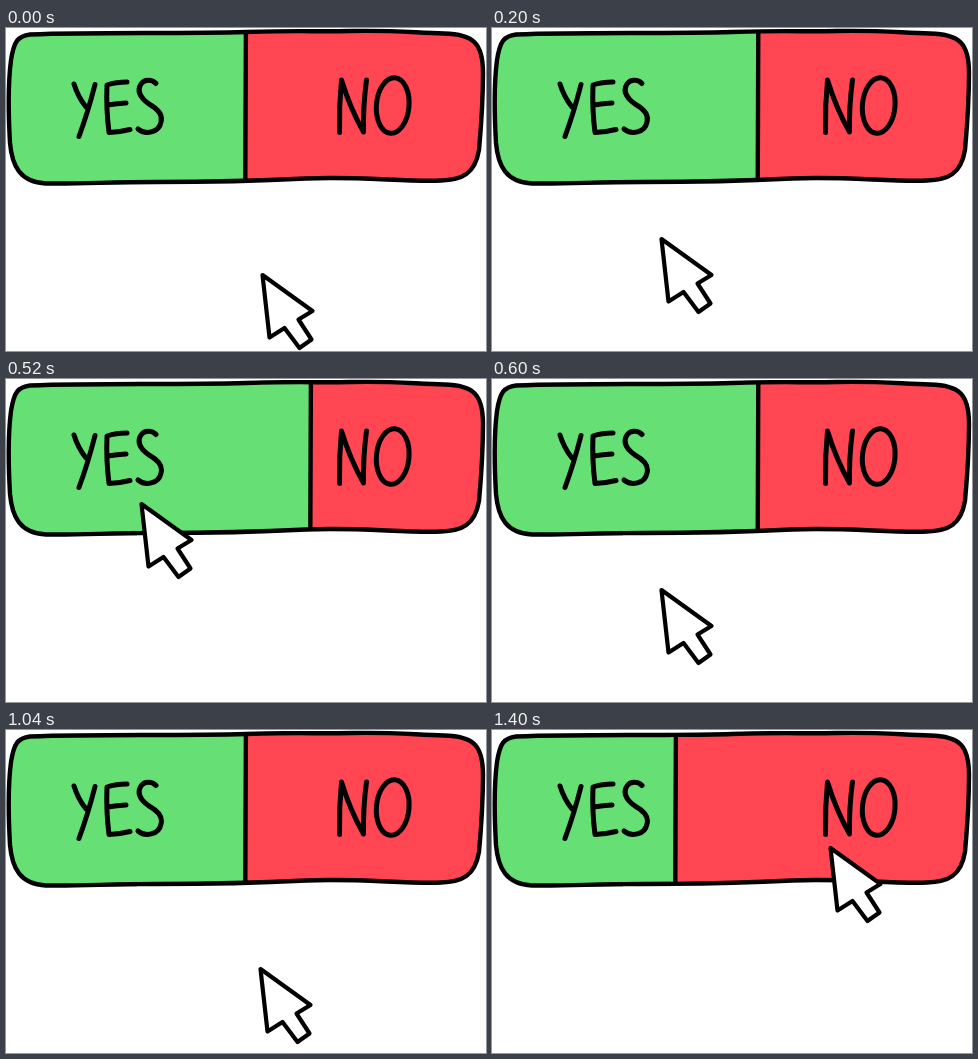
Write an HTML page that moves like this. It is 480 by 323 pixels and loops after 1.6 s.

```html
<!DOCTYPE html>
<html lang="en">
<head>
<meta charset="utf-8">
<title>Yes or no</title>
<style>
html, body { margin: 0; width: 100%; height: 100%; overflow: hidden; background: #fff; }
svg { display: block; width: 100vw; height: 100vh; }
.ink { fill: none; stroke: #000; stroke-width: 4.4; stroke-linecap: round; stroke-linejoin: round; }
.word { stroke-width: 5; }
#cursor { fill: #fff; stroke-width: 4.2; }
</style>
</head>
<body>
<svg viewBox="0 0 480 323" role="img" aria-label="A bar split between YES and NO, with a moving pointer">
  <defs>
    <path id="bar" d="M24 6.500C95 4 170 6 240 4S300 4 345 3S410 5 438 5.500C468 6 477 16 477 45C477 75 475 100 473 122C469 146 456 152 435 152.500C400 154 350 148 300 150.500S200 154 150 154S80 156 40 155.500C14 154 6 138 4 115C2 80 2 55 5 32C8 13 12 8 24 6.500Z"/>
    <clipPath id="inside"><use href="#bar"/></clipPath>
  </defs>
  <g clip-path="url(#inside)">
    <rect width="480" height="160" fill="#66e075"/>
    <g id="split">
      <rect width="480" height="160" fill="#ff4652"/>
      <path class="ink" d="M.4 0L-.2 160"/>
    </g>
  </g>
  <use class="ink" href="#bar"/>
  <g class="ink word">
    <path d="M68 56Q72 69 80 79M89 56.500Q82 84 73 108.500"/>
    <path d="M121 54Q110 54 101 57Q100 81 103 104.500Q114 104 124 101.500M102 77Q111 75.500 120 75"/>
    <path d="M150 55.500C146 51 138 51 135 56C130 64 136 71 143 76C152 81 157 87 155 94C153 105 139 107 132 101"/>
    <path d="M333.500 104.500Q333 78 335.500 52Q344 80 357.500 104Q357 78 360.500 52"/>
    <ellipse cx="386.700" cy="77.500" rx="16.300" ry="27.800" transform="rotate(5 386.700 77.500)"/>
  </g>
  <path id="cursor" class="ink" d="M0 0L50 36L36 44.500L49 64.500L37 73L22 53L7 62.500Z"/>
</svg>
<script>
const BEAT = 200, BEATS = 8, MIDDLE = 239.5;
const split = document.getElementById('split');
const cursor = document.getElementById('cursor');

// Pointer paths from rest to each answer: start, control, end
const toYes = { path: [[256.5, 247], [143, 236], [135.5, 125]], push: 65 };
const toNo = { path: [[254.5, 239], [276.5, 213.5], [338.5, 118]], push: -56 };

const bend = ([a, b, c], t) =>
  a.map((v, i) => (1 - t) ** 2 * v + 2 * t * (1 - t) * b[i] + t * t * c[i]);

function draw(time) {
  const beat = Math.floor(time / BEAT) % BEATS;
  const yes = beat < 4;
  const side = yes ? toYes : toNo;
  // Go to YES and back, then rest, then go to NO
  const t = yes ? 1 - Math.abs(beat - 2) / 2 : Math.max(0, (beat - 5) / 2);
  const edge = MIDDLE + side.push * t ** 1.3;
  split.setAttribute('transform', `translate(${edge})`);
  cursor.setAttribute('transform', `translate(${bend(side.path, t)})`);
}

const start = performance.now();
function tick() {
  draw(performance.now() - start);
  requestAnimationFrame(tick);
}
tick();
</script>
</body>
</html>
```
